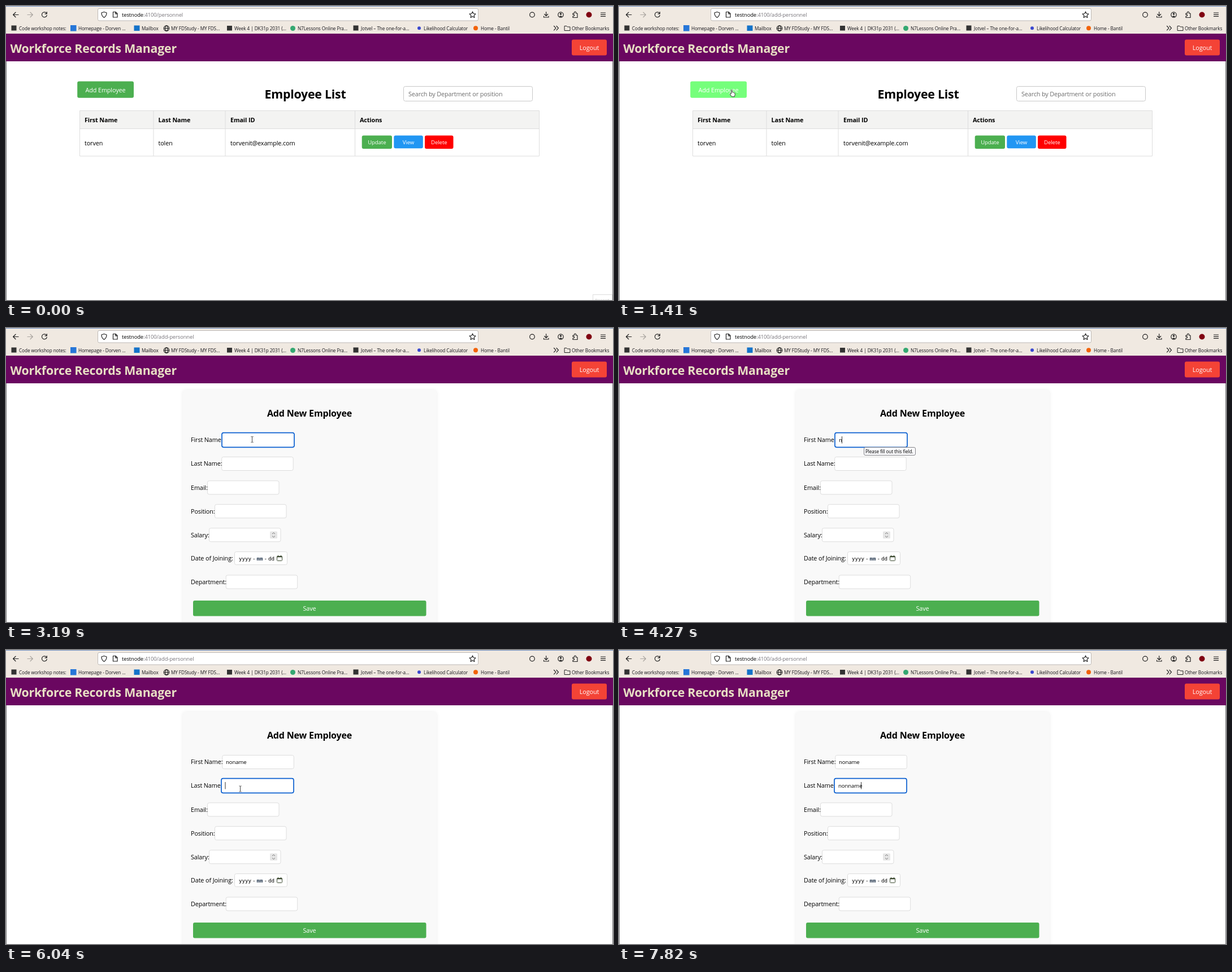
Recreate the animation shown at these times as an HTML page. Size 1074 by 521 pixels, loop 8000 ms.

```html
<!DOCTYPE html>
<html lang="en">
<head>
<meta charset="utf-8">
<title>Workforce records</title>
<style>
  html, body { margin: 0; width: 100%; height: 100%; overflow: hidden; background: #fff; }
  svg { display: block; width: 100vw; height: 100vh; }
  text { font: 10.8px "Open Sans", "Noto Sans", sans-serif; letter-spacing: -.01em; fill: #000; white-space: pre; }
  .bold { font-weight: 700; }
  .h1 { font-size: 21.3px; }
  .h2 { font-size: 16px; }
  .mid { text-anchor: middle; }
  .white text, text.white { fill: #fff; font-weight: 500; }
  .small text, text.small { font-size: 9.6px; }
  .marks text { font-size: 8.2px; fill: #15141a; }
  .url { font-size: 9.4px; }
  .mono text { font: 9.2px "DejaVu Sans Mono", monospace; letter-spacing: 0; }
  .line { fill: none; stroke: #222; stroke-width: 1.2; stroke-linecap: round; stroke-linejoin: round; }
  .fields rect { fill: #fff; stroke: #ddd; height: 24px; width: 126.5px; rx: 3px; }
  .ring { fill: #fff; stroke: #0a5fd0; stroke-width: 1.7; }
  .pointer { fill: #fff; stroke: #222; stroke-width: .9; stroke-linejoin: round; }
</style>
</head>
<body>
<svg viewBox="0 0 1074 521" preserveAspectRatio="none">
  <rect width="1074" height="521" fill="#fff"/>

  <!-- browser bars -->
  <rect width="1074" height="49" fill="#f0e9e1"/>
  <rect width="1074" height="1" fill="#7191c4"/>
  <rect x="162.5" y="4.5" width="673" height="21.5" rx="2.5" fill="#fff" stroke="#bdb9b5"/>
  <g class="line">
    <path d="M22 15.5h-9.3M17 11.2l-4.4 4.3 4.4 4.3"/>
    <path stroke="#aaa5a0" d="M38 15.5h9.3M43 11.2l4.4 4.3-4.4 4.3"/>
    <path d="M71.8 13a4.5 4.5 0 1 0 .5 3.5M72.3 10.5v3.3h-3.3"/>
    <path d="M173.5 10.5l4.5 1.5c0 4-1 6.5-4.5 8.5-3.5-2-4.5-4.5-4.5-8.5z"/>
    <path d="M189.5 10.5h4.5l3 3v6.5h-7.5zM193.7 10.8v3h3"/>
    <path d="M825.5 10l1.6 3.5 3.9.5-2.9 2.6.8 3.9-3.4-2-3.4 2 .8-3.9-2.9-2.6 3.9-.5z"/>
    <circle cx="931" cy="15.5" r="4.3"/>
    <path d="M955.7 10.5v6.5M952.7 14.5l3 3 3-3M951.5 18v2h8.5v-2"/>
    <circle cx="981.5" cy="15.5" r="4.7"/>
    <path d="M1003 13h2.5v-1.5a1.5 1.5 0 0 1 3 0v1.5h2.5v7.500h-8v-2.500h1.2a1.300 1.300 0 0 0 0-2.800h-1.200z"/>
    <path d="M1052.5 12h8M1052.5 15.2h8M1052.5 18.4h8"/>
    <path d="M969.5 35.5l3.5 3.7-3.5 3.7M974 35.5l3.5 3.7-3.5 3.7"/>
    <path stroke-width="1" d="M988.5 35.5h3.5l1.3 1.5h4.7v6.5h-9.5z"/>
  </g>
  <path d="M979 18.5q2.5-2.5 5 0-2.5 2-5 0z" fill="#222"/>
  <circle cx="981.5" cy="14" r="1.7" fill="#222"/>
  <circle cx="1031.5" cy="15.5" r="5" fill="#800012"/>
  <text class="url" x="205" y="19.2">testnode<tspan fill="#77747a">:4100/<tspan id="path">personnel</tspan></tspan></text>

  <g class="marks">
    <rect x="9.5" y="34.5" width="9" height="9" fill="#333"/>
    <text x="23" y="42.5">Code workshop notes:</text>
    <rect x="114" y="34" width="10.5" height="10.5" fill="#2676d8"/>
    <text x="128" y="42.5">Homepage - Dorven ...</text>
    <rect x="226.5" y="34.5" width="10" height="9.5" fill="#1473c9"/>
    <text x="240" y="42.5">Mailbox</text>
    <g class="line"><circle cx="284" cy="39.5" r="4.7"/><ellipse cx="284" cy="39.5" rx="2.1" ry="4.7"/><path d="M279.5 39.5h9"/></g>
    <text x="292" y="42.5">MY FDStudy - MY FDS...</text>
    <rect x="391" y="35" width="9" height="8.5" fill="#333"/>
    <text x="404" y="42.5">Week 4 | DK31p 2031 (...</text>
    <circle cx="507.5" cy="39.5" r="4.5" fill="#34a871"/>
    <text x="516" y="42.5">N7Lessons Online Pra...</text>
    <rect x="614.5" y="34.5" width="9" height="9" fill="#333"/>
    <text x="628" y="42.5">Jotvel – The one-for-a...</text>
    <circle cx="731" cy="39.3" r="3" fill="#3a48cf"/>
    <text x="739" y="42.5">Likelihood Calculator</text>
    <circle cx="831" cy="39.3" r="4" fill="#f26207"/>
    <text x="840" y="42.5">Home - Bantil</text>
    <text x="1001" y="42.5">Other Bookmarks</text>
  </g>

  <!-- page header -->
  <rect y="49" width="1074" height="49" fill="#6a0760"/>
  <text class="bold h1" x="7.5" y="82.5" style="fill:#e8dfc4">Workforce Records Manager</text>
  <rect x="1001" y="59.5" width="62" height="28" rx="3" fill="#f44336"/>
  <text class="white mid" x="1032" y="77.5">Logout</text>

  <g id="list">
    <rect id="add" x="126.2" y="133.5" width="99.8" height="29.2" rx="3"/>
    <text class="white mid" x="176" y="153">Add Employee</text>
    <text class="bold h1 mid" x="529.5" y="164">Employee List</text>
    <rect x="703.5" y="142.5" width="228" height="26" rx="3" fill="#fff" stroke="#c8c8c8"/>
    <text x="712" y="159.7" style="fill:#6c6c6c">Search by Department or position</text>
    <rect x="130" y="185" width="813" height="33" fill="#f3f3f2"/>
    <path d="M130.5 185.500h813v80.500h-813zM130.500 217.500h813M261 185.500v80.500M388 185.500v80.500M617.500 185.500v80.500" fill="none" stroke="#ddd"/>
    <text class="bold" x="139" y="206.3">First Name</text>
    <text class="bold" x="269.5" y="206.3">Last Name</text>
    <text class="bold" x="397" y="206.3">Email ID</text>
    <text class="bold" x="626" y="206.3">Actions</text>
    <text x="139" y="246.5">torven</text>
    <text x="269.5" y="246.5">tolen</text>
    <text x="397" y="246.5">torvenit@example.com</text>
    <g class="white small mid">
      <rect x="629.7" y="229.5" width="53.3" height="23.5" rx="3" fill="#4caf50"/><text x="656.3" y="245.3">Update</text>
      <rect x="686.3" y="229.5" width="51.5" height="22.8" rx="3" fill="#2196f3"/><text x="712" y="245.3">View</text>
      <rect x="741" y="229.5" width="50.5" height="23.5" rx="3" fill="#f00"/><text x="766.3" y="245.3">Delete</text>
    </g>
  </g>

  <g id="form">
    <rect x="313" y="110" width="449" height="450" rx="6" fill="#f9f9f9" style="filter:drop-shadow(0 0 3px rgba(0,0,0,.07))"/>
    <text class="bold h2 mid" x="537" y="157">Add New Employee</text>
    <g class="fields">
      <rect x="382.8" y="186.5"/>
      <rect x="381.7" y="228.5"/>
      <rect x="356.5" y="270.8"/>
      <rect x="369.5" y="312.7"/>
      <rect x="359.5" y="354.7"/>
      <rect x="404.5" y="396.5" style="width:93px;height:23px"/>
      <rect x="389.2" y="438"/>
    </g>
    <text x="327" y="202.3">First Name:</text>
    <text x="327" y="244.3">Last Name:</text>
    <text x="327" y="286.5">Email:</text>
    <text x="327" y="328.5">Position:</text>
    <text x="327" y="370.5">Salary:</text>
    <text x="327" y="411.8">Date of Joining:</text>
    <text x="327" y="454">Department:</text>
    <rect x="467" y="360.5" width="13" height="12.5" rx="1.5" fill="#e6e6e6"/>
    <path d="M471 365l2.5-2.3 2.5 2.3M471 368.5l2.5 2.3 2.5-2.3" fill="none" stroke="#666" stroke-width=".9"/>
    <g class="mono">
      <text x="412" y="411.5">yyyy</text><text x="436" y="411.5">-</text>
      <text x="443.5" y="411.5" style="font-weight:700;fill:#26384f">mm</text><text x="456.5" y="411.5">-</text>
      <text x="464" y="411.5">dd</text>
    </g>
    <rect x="479.5" y="404.5" width="9" height="8" rx="1" fill="#fff" stroke="#3c4a30"/>
    <path d="M479 405.5h10M481.5 403v2M486.5 403v2" stroke="#3c4a30" stroke-width="1.5"/>
    <rect x="331" y="483" width="412.5" height="27.5" rx="3" fill="#4caf50"/>
    <text class="white mid" x="537" y="501.3">Save</text>
    <rect id="ring1" class="ring" x="382" y="185.7" width="128" height="25.6" rx="3"/>
    <rect id="ring2" class="ring" x="381" y="227.7" width="128" height="25.6" rx="3"/>
    <text id="first" class="small" x="389" y="202"></text>
    <text id="last" class="small" x="388" y="244"></text>
    <rect id="caret" width="1" height="12.5" fill="#333"/>
    <g id="tip">
      <rect x="433.5" y="211.5" width="91" height="14" rx="2.5" fill="#f9f9fb" stroke="#85858a"/>
      <text x="436" y="221.7" style="font-size:8.1px">Please fill out this field.</text>
    </g>
  </g>

  <g id="record">
    <rect x="1038.5" y="511.5" width="34" height="20" fill="#fff" stroke="#ddd"/>
    <text x="1042" y="524" style="font-size:8px;fill:#c8c8c8">Record</text>
  </g>
  <path d="M.5 98v423M1073.5 98v423" stroke="#77777a"/>

  <path id="arrow" class="pointer" d="M.5.5v8.7l2-1.8 1.5 3.1 1.3-.6-1.5-3h2.7z"/>
  <path id="hand" class="pointer" d="M2.5 7.5v-6q0-1 .9-1t.9 1v3.5q1.6-.6 1.9.5 1.3-.4 1.6.6 1.4-.2 1.4 1.2v2.2l-1 3.2h-4.7l-2.8-4.2q-.5-1.3.5-1.4z"/>
  <path id="beam" fill="none" stroke="#444" d="M-2-5h1.4l.6.5.6-.5h1.4M-2 5h1.4l.6-.5.6.5h1.4M0-4.5v9"/>
</svg>

<script>
  const LOOP = 8000;
  const el = id => document.getElementById(id);
  const show = (id, on) => el(id).style.display = on ? '' : 'none';

  // Each step changes only the values it lists; the rest carry over.
  const steps = [
    [0, { page: 'list', record: true, hover: false, path: 'personnel', cursor: [], focus: 0, caret: 0, first: '', last: '', tip: false }],
    [350, { record: false, cursor: ['arrow', 785, 356] }],
    [700, { cursor: ['arrow', 381, 205.5] }],
    [1050, { cursor: ['arrow', 245, 169] }],
    [1410, { cursor: ['hand', 196, 148], hover: true, path: 'add-personnel' }],
    [1780, { page: 'form', cursor: ['arrow', 433, 267] }],
    [2120, { cursor: ['arrow', 444.5, 266.5] }],
    [2480, { cursor: ['arrow', 433, 214.5] }],
    [2830, { cursor: ['beam', 435.5, 207], focus: 1, caret: 389 }],
    [3190, { cursor: ['beam', 435.5, 197.5], caret: 0 }],
    [3900, { caret: 389, tip: true }],
    [4270, { cursor: [], first: 'n', caret: 394 }],
    [4620, { first: 'nona', caret: 410 }],
    [4980, { first: 'noname', caret: 424 }],
    [5330, { caret: 0 }],
    [5690, { tip: false, cursor: ['beam', 427.5, 231] }],
    [6040, { cursor: ['beam', 414.5, 246], focus: 2, caret: 387.5 }],
    [6750, { cursor: [], last: 'non', caret: 404 }],
    [7110, { caret: 0 }],
    [7470, { last: 'nonnam', caret: 423 }],
    [7820, { last: 'nonname', caret: 428 }]
  ];

  function draw(s) {
    const [kind, x, y] = s.cursor;
    for (const id of ['list', 'form']) show(id, s.page === id);
    for (const id of ['arrow', 'hand', 'beam']) show(id, kind === id);
    if (kind) el(kind).setAttribute('transform', `translate(${x} ${y})`);
    show('record', s.record);
    show('tip', s.tip);
    show('ring1', s.focus === 1);
    show('ring2', s.focus === 2);
    show('caret', s.caret);
    el('caret').setAttribute('x', s.caret);
    el('caret').setAttribute('y', s.focus === 2 ? 234 : 192);
    el('add').setAttribute('fill', s.hover ? '#75ff7b' : '#4caf50');
    for (const id of ['path', 'first', 'last']) el(id).textContent = s[id];
  }

  let shown = -1;
  function tick() {
    const time = performance.now() % LOOP;
    const past = steps.filter(([at]) => at <= time);
    if (past.length !== shown) {
      shown = past.length;
      draw(Object.assign({}, ...past.map(([, change]) => change)));
    }
    requestAnimationFrame(tick);
  }
  tick();
</script>
</body>
</html>
```
